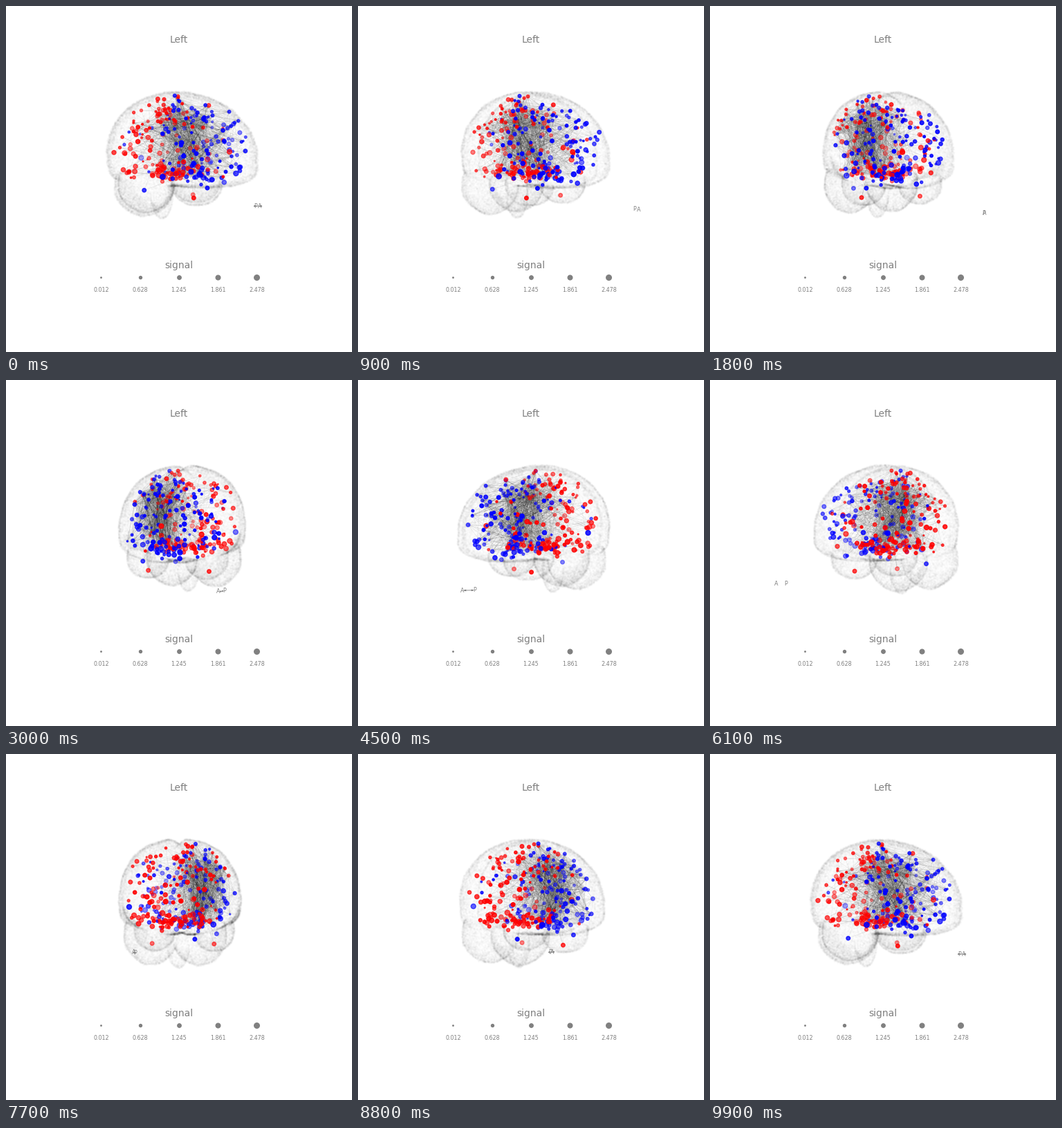
Recreate the animation shown at these times as a matplotlib script. Size 500x500 px, loop 10 s.

```python
import numpy as np
import matplotlib.pyplot as plt
from matplotlib.animation import FuncAnimation
from matplotlib.collections import LineCollection
from matplotlib.patches import Rectangle

FRAMES, SIZE, DPI = 100, 500, 100
CX, CY, FOCAL = 253.75, 200, 1463     # screen centre and camera distance
# Cerebrum: half width, half length, rise, drop, mid height, roundness
WIDTH, LENGTH, RISE, DROP, MID, POW = 86, 109, 92, 46, 15, 2.3
GRAY = "gray"
rng = np.random.default_rng(7)

# Centre and semi-axes of the temporal lobes, cerebellum and brainstem
LOBES = [((s * 44, 21, 55), (30, 36, 31)) for s in (-1, 1)]
LOBES += [((s * 34, -53, 58), (38, 42, 42)) for s in (-1, 1)]
LOBES += [((0, -29, 74), (16, 16, 32))]


def radius(ang):
    """Side profile: a slightly tilted dome over a flat floor (z points down)."""
    c, s = np.cos(ang), np.sin(ang)
    height = np.where(s < 0, RISE, DROP)
    p = np.where(s < 0, 2, 4)
    r = (abs(c / LENGTH) ** p + abs(s / height) ** p) ** (-1 / p)
    return r * (1 + 0.06 * s * c)


def directions(n):
    v = rng.normal(size=(n, 3))
    return v / np.linalg.norm(v, axis=1, keepdims=True)


def cerebrum(n, scale=1):
    u = directions(n)
    flat = np.hypot(u[:, 1], u[:, 2])
    k = scale * (abs(u[:, 0]) ** POW + flat ** POW) ** (-1 / POW)
    ang = np.arctan2(u[:, 2], u[:, 1])
    x = WIDTH * k * u[:, 0]
    groove = 1 - 0.07 * np.exp(-(x / 7) ** 2)
    r = radius(ang) * k * flat * groove
    return np.column_stack([x - 2, r * np.cos(ang), MID + r * np.sin(ang)])


def in_cerebrum(p, scale=0.97):
    y, z = p[:, 1], p[:, 2] - MID
    r = np.hypot(y, z) / radius(np.arctan2(z, y))
    return abs(p[:, 0] / WIDTH) ** POW + r ** POW < scale ** POW


def in_lobe(p, lobe):
    return (((p - lobe[0]) / np.array(lobe[1])) ** 2).sum(axis=1) < 0.92


def brain_shell(density=1.15):
    parts = [cerebrum(23000)]
    for lobe in LOBES:
        a, b, c = lobe[1]
        p = directions(int(density * (a * b + b * c + a * c))) * lobe[1] + lobe[0]
        parts.append(p[~in_cerebrum(p)])
    for part, own in zip(range(len(parts)), [None] + LOBES):
        for lobe in LOBES:
            if lobe is not own:
                parts[part] = parts[part][~in_lobe(parts[part], lobe)]
    p = np.vstack(parts)
    folds = np.sin(p / (4, 5, 5)).sum(axis=1)
    return p * (1 + 0.004 * folds + rng.normal(0, 0.006, len(p)))[:, None]


def project(p, azim):
    c, s = np.cos(azim), np.sin(azim)
    depth = p[:, 0] * c + p[:, 1] * s
    k = FOCAL / (FOCAL - depth)
    x = CX + (p[:, 1] * c - p[:, 0] * s) * k
    return np.column_stack([x, CY + p[:, 2] * k]), depth


def make_nodes(n=285):
    """Nodes inside the cortex, mostly red behind and blue in front."""
    pos = cerebrum(n, 0.9 * rng.random(n) ** 0.22)
    pos += rng.normal(0, 2.5, pos.shape) - (0, 0, 4)
    front = 1 / (1 + np.exp(-(pos[:, 1] - 5 + 0.15 * pos[:, 0]) / 14))
    blue = rng.random(n) < 0.08 + 0.8 * front
    value = (0.05 + 2.2 * rng.beta(1.6, 1.8, n)) * (0.9 + pos[:, 2] / 220)

    # Stragglers on the crown and below the cortex
    red_far = [(45, 17, 75), (-47, 17, 75), (15, -34, -65), (9, 39, -56)]
    blue_far = [(28, -53, 65), (46, 36, 61)]
    pos = np.vstack([pos, red_far, blue_far])
    blue = np.concatenate([blue, [False] * len(red_far), [True] * len(blue_far)])
    value = np.concatenate([value, np.full(len(pos) - n, 1.3)])
    rgb = np.where(blue[:, None], (0.0, 0.0, 1.0), (1.0, 0.0, 0.0))
    return pos, rgb, value


def make_edges(pos, n=1300):
    """Links gathered around a hub in the right hemisphere."""
    away = (pos - (42, 20, -14)) / (30, 46, 34)
    hub = np.exp(-(away ** 2).sum(axis=1) / 2)
    loose = hub + 0.06 + 0.16 * (pos[:, 0] > 0)
    ends = [rng.choice(len(pos), n, p=w / w.sum()) for w in (hub, loose)]
    return np.column_stack(ends)


def area(value):
    """Marker area in square points for a signal value."""
    return 0.9 + 11.6 * value


shell = brain_shell()
nodes, rgb, value = make_nodes()
edges = make_edges(nodes)
sizes = area(value)

plt.rcParams["font.family"] = "DejaVu Sans"
fig = plt.figure(figsize=(SIZE / DPI, SIZE / DPI), dpi=DPI, facecolor="white")
ax = fig.add_axes([0, 0, 1, 1])
ax.set(xlim=(0, SIZE), ylim=(SIZE, 0))
ax.axis("off")


def label(x, y, s, size, **align):
    style = dict(ha="center", va="baseline") | align
    return ax.text(x, y, s, size=size, color=GRAY, zorder=5, **style)


label(250, 53, "Left", 10)
label(250, 379.5, "signal", 10)
for i, v in enumerate(np.linspace(0.012, 2.478, 5)):
    x = 137.3 + 56.25 * i
    ax.scatter([x], [392.2], s=area(v), color=GRAY, linewidths=1)
    label(x + 0.2, 413, f"{v - 0.0003:.3f}", 5.79)

cloud, = ax.plot([], [], "o", ms=2, mew=0, color="black", alpha=0.008, zorder=1)
web = LineCollection([], colors="black", linewidths=0.4, alpha=0.09, zorder=2)
ax.add_collection(web)
dots = ax.scatter(*np.zeros((2, len(nodes))), s=sizes, linewidths=1, zorder=3)

ARROW = np.array([(-96, 117.5 + h, 95) for h in (6, -6)])
arrow, = ax.plot([], [], color=GRAY, lw=0.6, zorder=4)
arrow.set_clip_path(Rectangle((112, 0), 276, SIZE, transform=ax.transData))
front_tag = label(0, 0, "A", 5.79, ha="right", va="center")
back_tag = label(0, 0, "P", 5.79, ha="left", va="center")


def draw_arrow(azim):
    (a, p), _ = project(ARROW, azim)
    front_tag.set_position(a)
    back_tag.set_position(p)
    path = [a, p]
    for tip, end in ((a, p), (p, a)):
        base = tip + 0.18 * (end - tip)
        path += [(np.nan, np.nan), base - (0, 0.8), tip, base + (0, 0.8)]
    arrow.set_data(*np.array(path).T)


def update(i):
    azim = 2 * np.pi * i / (FRAMES - 1)
    cloud.set_data(*project(shell, azim)[0].T)
    xy, depth = project(nodes, azim)
    web.set_segments(xy[edges])
    order = np.argsort(depth)
    near = (depth - depth.min()) / np.ptp(depth)
    rgba = np.column_stack([rgb, 0.3 + 0.7 * near])[order]
    dots.set_offsets(xy[order])
    dots.set_sizes(sizes[order])
    dots.set_facecolor(rgba)
    dots.set_edgecolor(rgba)
    draw_arrow(azim)
    return cloud, web, dots, arrow, front_tag, back_tag


anim = FuncAnimation(fig, update, frames=FRAMES, interval=100, repeat=True,
                     repeat_delay=0, blit=False)
plt.show()
```
